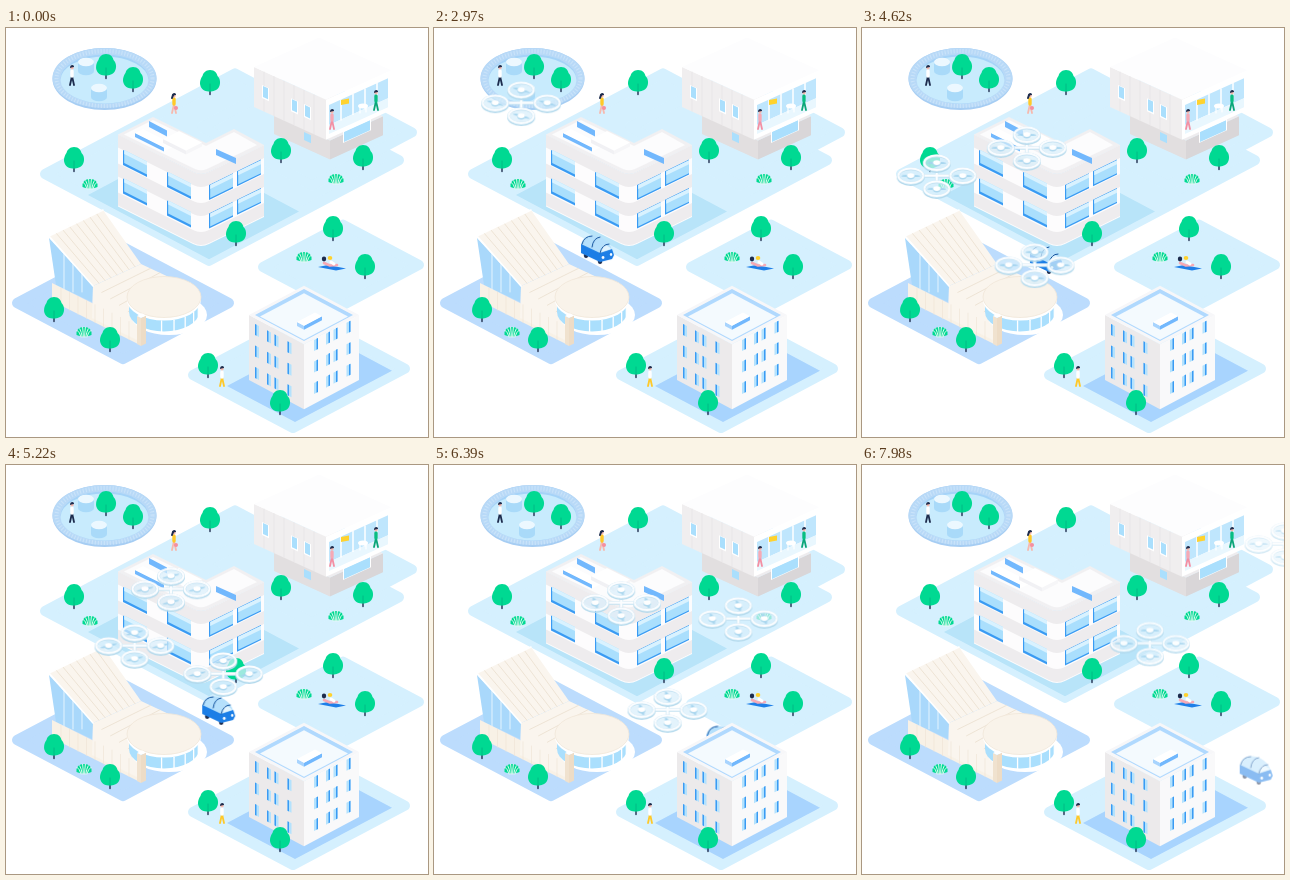
Recreate the animation shown at these times as an HTML page. Size 422 px wide and 409 px high, loop 8000 ms.

```html
<!DOCTYPE html>
<html lang="en">
<head>
<meta charset="utf-8">
<title>Isometric town</title>
<style>
html, body { margin: 0; width: 100%; height: 100%; overflow: hidden; background: #fff; }
svg { display: block; width: 422px; height: 409px; }
.mover { animation: 8s linear infinite both; }
#car { animation-name: car; }
#hover { animation-name: hover; }
#east { animation-name: cross, east; --from: translate(-340px, -105px); --to: translate(378px, 333px); }
#north { animation-name: cross, north; --from: translate(-171px, 455px); --to: translate(424px, 78px); }
.blade { animation: spin .42s linear infinite; }
@keyframes spin { to { transform: rotate(360deg); } }
@keyframes cross { from { transform: var(--from); } to { transform: var(--to); } }
@keyframes east { 0%, 51% { opacity: 0; } 57%, 92% { opacity: 1; } 99%, 100% { opacity: 0; } }
@keyframes north { 0%, 43% { opacity: 0; } 50%, 94% { opacity: 1; } 100% { opacity: .55; } }
@keyframes car {
  0%, 8.6% { transform: translate(18px, 146px); opacity: 0; animation-timing-function: cubic-bezier(.3, .36, .65, .8); }
  37.1% { transform: translate(163px, 221px); opacity: 1; }
  57.8% { transform: translate(184px, 231px); animation-timing-function: cubic-bezier(.4, .25, .7, .65); }
  72.4% { transform: translate(249px, 263px); }
  93% { opacity: 1; }
  100% { transform: translate(395px, 305px); opacity: .5; }
}
@keyframes hover {
  0%, 28.9% { transform: translate(62px, 31px); opacity: 0; }
  33% { opacity: 1; }
  37.1% { transform: translate(87px, 75px); }
  48.8% { transform: translate(163px, 119px); }
  59% { transform: translate(165px, 120px); }
  72.4% { transform: translate(165px, 129px); animation-timing-function: cubic-bezier(.3, .1, .7, .67); }
  100% { transform: translate(289px, 179px); opacity: .9; }
}
</style>
</head>
<body>
<svg id="town" viewBox="0 0 422 409" xmlns="http://www.w3.org/2000/svg"></svg>
<script>
const SKY = '#d5f0fe', GLASS = '#aadffd', BLUE = '#3a9bf3', MID = '#72b8fd', PALE = '#a8d4fe';
const INK = '#1d2c4d', GREEN = '#00d992', GREY = '#eeecee', CREAM = '#faf5ee', SEAM = '#eadfce';
const SLOPE = .53;

const path = (d, fill, extra = '') => `<path d="${d}" fill="${fill}" ${extra}/>`;
const poly = (pts, fill, extra = '') => `<polygon points="${pts.join(' ')}" fill="${fill}" ${extra}/>`;
const oval = (x, y, rx, ry, fill, extra = '') =>
  `<ellipse cx="${x}" cy="${y}" rx="${rx}" ry="${ry}" fill="${fill}" ${extra}/>`;
const line = (d, color, width = 1) =>
  path(d, 'none', `stroke="${color}" stroke-width="${width}" stroke-linecap="round" stroke-linejoin="round"`);
const at = (x, y, body) => `<g transform="translate(${x} ${y})">${body}</g>`;
const each = (list, fn) => list.map(fn).join('');
const times = (n, fn) => Array.from({ length: n }, (_, i) => fn(i)).join('');
const mix = (a, b, t) => a.map((v, i) => v + (b[i] - v) * t);

// Flat rhombus from its left corner: a runs up-right, b runs down-right
const tile = (x, y, a, b, fill, s = SLOPE, extra = '') => poly(
  [[x, y], [x + a, y - a * s], [x + a + b, y + (b - a) * s], [x + b, y + b * s]], fill, extra);
const slab = (x, y, a, b, fill) =>
  tile(x, y, a, b, fill, SLOPE, `stroke="${fill}" stroke-width="10" stroke-linejoin="round"`);
// Upright parallelogram whose top edge has the given slope
const pane = (x, y, w, h, s, fill) => path(`M${x} ${y}l${w} ${w * s}v${h}l${-w} ${-w * s}z`, fill);
const box = (x, y, a, b, h, [top, left, right], s = SLOPE) =>
  pane(x, y, b, h, s, left) + pane(x + b, y + b * s, a, h, -s, right) + tile(x, y, a, b, top, s);
// Evenly spaced seams from edge a-b to edge c-d
const seams = (n, a, b, c, d) => times(n, i => {
  const t = (i + 1) / (n + 1);
  return line(`M${mix(a, b, t)}L${mix(c, d, t)}`, SEAM, .8);
});

const tree = ([x, y]) => at(x, y - 1,
  line('M0 6V13.500', INK, 1.4) +
  path('M0-11C5-11 7-7.500 7.500-5C10-3 11 2 9 6C7 9.500 3 10.500 0 10.500C-4 10.500 -8 9.500 -9.500 5C-10.800 1 -9-3 -7.500-5C-7-8 -4-11 0-11Z', GREEN) +
  line('M0 10V3', '#00b384', .8));

const bush = ([x, y]) => at(x, y,
  path('M-7.500 3Q-8-5 0-5Q8-5 7.500 3Q0 6.500 -7.500 3Z', GREEN) +
  times(6, i => {
    const k = i - 2.5;
    return line(`M${k * 1.2} 5Q${k * 1.6} 0 ${k * 2.8} ${Math.abs(k) * 1.5 - 5.5}`, '#f0fcf8', .9);
  }));

const person = (x, y, shirt, legs, bag = '') => at(x, y,
  line('M0 0L-2 9M0 0L2 9', legs, 1.8) + line('M0-5V0', shirt, 3.4) +
  oval(0, -8.5, 1.7, 2, '#f7b9ae') + path('M-2-8Q-2-11 .5-11Q2.500-10.500 2-9L-.5-8.500Z', INK) + bag);

const barrel = (x, y) =>
  path(`M${x - 8} ${y}v9a8 4.300 0 0 0 16 0v-9z`, '#a9daf9') + oval(x, y, 8, 4.3, '#ecf8ff');

const pool =
  oval(98.5, 51, 52, 31, '#a6cdf3') + oval(98.5, 50, 52, 30, '#b8d9f7') +
  oval(98.5, 50.5, 48, 27.5, 'none', 'stroke="#cbe4fa" stroke-width="4" stroke-dasharray="1 2"') +
  oval(98.5, 51, 44, 24.5, '#a5d3f8') + oval(98.5, 52, 44, 23.5, '#c8ebfd') +
  barrel(80, 34) + barrel(93, 60) + person(66, 48, '#fff', INK);

const grounds =
  slab(39, 146, 190, 164, SKY) + slab(196, 99, 100, 110, SKY) + tile(82, 167, 90, 121, '#b8e4f9') +
  slab(257, 239, 80, 76, SKY) +
  slab(11, 275, 106, 106, '#bcdcfd') +
  slab(187, 347, 112, 100, SKY) + tile(221, 358, 97, 68, PALE);

const HOUSE = .455;
const house =
  box(268, 87, 53, 56, 19, [GREY, '#e2dfe0', '#d9d6d8'], HOUSE) +
  pane(337, 103, 28, 12, -HOUSE, '#fff') + pane(338, 104, 26, 10, -HOUSE, GLASS) +
  pane(298, 104, 7, 8, HOUSE, GLASS) +
  box(248, 39, 65, 72, 40, ['#fdfdfe', '#f0eeef', '#fff'], HOUSE) +
  times(6, i => line(`M${258 + i * 10} ${44 + i * 4.6}v39`, '#e4e1e3', .6)) +
  each([256, 285, 298], x => {
    const y = 57 + (x - 256) * HOUSE;
    return pane(x, y, 7, 13, HOUSE, '#fff') + pane(x + 1, y + 1, 5, 11, HOUSE, GLASS);
  }) +
  pane(323, 77, 59, 20, -HOUSE, '#bfe6fd') + pane(323, 97, 59, 9, -HOUSE, '#e9f7fe') +
  times(4, i => line(`M${335 + i * 12} ${72 - i * 5.5}v20`, '#fff', 1.5)) +
  pane(335, 72, 8, 5, -.2, '#ffd22e') +
  oval(357, 78, 5, 2.5, '#fff') + line('M354 80V85M360 80V84', '#fff', 1.2) +
  person(326, 92, '#f6a9b5', '#f38fa3') + person(370, 73, '#08bd83', '#0aa579');

// Office facade strip: left wall, rounded corner, right wall
const strip = (y, h) => {
  const edge = (v, back) => back
    ? `L258 ${117 + v}L203 ${144 + v}Q195 ${148 + v} 187 ${144 + v}L112 ${106.5 + v}`
    : `M112 ${106.5 + v}L187 ${144 + v}Q195 ${148 + v} 203 ${144 + v}L258 ${117 + v}`;
  return edge(y) + edge(y + h, true) + 'Z';
};
const wideWindow = (x, y, s) =>
  pane(x, y, 24, 15, s, BLUE) + pane(x + 1.2, y, 22.8, 13, s, GLASS) + pane(x + 1.2, y, 22.8, 4, s, '#d9f2ff');

const office =
  path(strip(0, 72), '#fdfcfd') +
  each([0, 29, 58], y => path(strip(y, 13), GREY)) +
  times(4, i => {
    const col = i % 2 * (i < 4), row = i >> 1, drop = 13 + row * 28.5;
    return wideWindow(117 + col * 44, 109 + col * 22 + drop, .5) +
      wideWindow(203 + col * 28, 144 - col * 13.7 + drop, -.49);
  }) +
  path('M112 106.500L147 89L200 115L228 101L258 117L203 144Q195 148 187 144Z', '#f1f0f2') +
  path('M118 106.500L147 92L200 118L228 104L251 117L201 141Q195 143.500 189 141Z', '#fcfcfd') +
  pane(143, 93, 18, 6, SLOPE, MID) +
  box(129, 105, 8, 29, 4, ['#fff', MID, '#fff'], .5) +
  box(157, 111, 16, 23, 4, ['#fff', '#f1f1f4', '#f6f6f8'], .5) +
  pane(210, 121, 20, 6, .45, MID);

const ROOF = { left: [43, 208], top: [97, 182], right: [135, 236], low: [87, 258] };
const theater =
  poly([[43, 210], [50, 257], [86, 274], ROOF.low], '#a9d8fb') +
  times(3, i => line(`M${58 + i * 9} ${224 + i * 11}V264`, '#e4f4fe')) +
  pane(46, 255, 85, 18, .5, '#f8f1e6') +
  poly([ROOF.low, ROOF.right, [182, 258], [131, 292], [131, 312], [86, 290]], CREAM) +
  times(9, i => line(`M${55 + i * 8.5} ${260 + i * 4.2}v18`, '#eee3d4', .6)) +
  poly(Object.values(ROOF), CREAM) +
  seams(7, ROOF.left, ROOF.top, ROOF.low, ROOF.right) +
  seams(4, ROOF.low, [131, 290], ROOF.right, [182, 258]) +
  line(`M${ROOF.low}L${ROOF.left}L${ROOF.top}`, '#fff', 1.6) +
  oval(163, 287, 38, 20, '#fff') +
  path('M123 272v12a35 19.500 0 0 0 70 0v-12z', GLASS) +
  times(5, i => {
    const a = .2 + i * .36;
    return line(`M${158 + 35 * Math.cos(a)} ${274 + 19 * Math.sin(a)}v11`, '#fff', 1.3);
  }) +
  path('M121 269v3a37 20.500 0 0 0 74 0v-3z', '#fff') +
  oval(158, 269, 37, 20.5, '#f9f3ea', 'stroke="#f0e6d8" stroke-width=".8"') +
  box(131, 288, 5, 4, 28, ['#fff', '#f0e2cf', '#eddcc6']);

const slit = (x, y, s) => pane(x, y, 4, 11, s, '#b4e2fd') + pane(s > 0 ? x : x + 2.5, s > 0 ? y : y - 1.3, 1.5, 11, s, BLUE);
const tower =
  box(243, 287, 55, 55, 65, ['#f7f7f9', '#eceaeb', '#f9f9fa']) +
  tile(249, 287, 49, 49, '#b0d9fe') + tile(254, 288.5, 44, 44, '#f4fafe') +
  box(291, 294, 18, 7, 4, ['#fff', PALE, MID]) +
  times(3, row => each([0, 12, 19.5, 32.5], dx =>
    slit(249 + dx, 296 + dx * SLOPE + row * 21.5, SLOPE) +
    slit(308 + dx, 312 - dx * SLOPE + row * 21.5, -SLOPE)));

const picnic =
  tile(312, 239, 10, 18, '#1f7fe8', .2) +
  line('M318 235L324 237.500L331 237', '#f6a9b5', 2.6) + line('M325 234L328 236', '#fff', 3) +
  oval(318, 231, 2.2, 2.4, INK) + oval(324, 230, 2.3, 2, '#ffd22e');

const walkers =
  person(168, 76, '#ffc928', '#f7b9ae', oval(2, 4, 2, 2, '#f58fa0') + line('M-1-9L-2-6', INK, 2)) +
  person(216, 349, '#fff', '#ffc928');

const car = `<g id="car" class="mover">` +
  times(2, i => oval(-11 + i * 14, 6 + i * 6, 2.2, 3, INK)) +
  path('M-16-5C-14-12 -9-14 -3-13.500C5-13 13-7 15 1L3 5L-16-3Z', '#b5e0fc') +
  path('M-16-5L3 4L15 0L17 6L15 10L3 13L-16 4Z', '#1c7ee6') +
  path('M4 3L6-4Q11-4 14 0Z', '#e3f5ff') +
  line('M-15-5Q-13-13 -5-13M-5-2Q-4-11 3-12M3 4Q5-5 12-5', '#14549f') +
  oval(6, 8.5, 1.4, 1.4, '#fff') + oval(14, 5.5, 1.2, 1.4, '#fff') + '</g>';

const rotor = (dx, dy) => at(dx, dy,
  oval(0, 1.4, 13.2, 7.8, 'none', 'stroke="#b3d9ec" stroke-width="1.4"') +
  oval(0, 0, 12.5, 7.2, '#d8effb', 'fill-opacity=".72"') +
  `<g transform="scale(1 .58)"><g class="blade">${oval(0, 0, 9.5, 2, '#a3d3ee')}</g></g>` +
  oval(0, 0, 12.5, 7.2, 'none', 'stroke="#c2e1f1" stroke-width="2.8"') +
  oval(0, -.2, 12.5, 7.2, 'none', 'stroke="#fbfdff" stroke-width="2"') +
  oval(0, .8, 3.8, 2.7, '#aed8ef') + oval(0, -.4, 3.6, 2.4, '#fff'));

const drone = id => `<g id="${id}" class="mover">` +
  line('M-14 0H14M0-6V6', '#c2e1f1', 3.4) + line('M-14-.4H14M0-6V6', '#fbfdff', 2.4) +
  times(4, i => {
    const a = (i - 1) * Math.PI / 2;
    return rotor(26 * Math.cos(a), 13 * Math.sin(a));
  }) + '</g>';

const trees = [[100, 38], [127, 51], [204, 54], [68, 131], [275, 122], [357, 129], [230, 205],
  [327, 200], [359, 238], [48, 281], [104, 311], [202, 337], [274, 374]];
const bushes = [[84, 156], [330, 151], [298, 229], [78, 304]];

document.getElementById('town').innerHTML =
  grounds + pool + house + office + car + theater + tower +
  each(bushes, bush) + walkers + picnic + each(trees, tree) +
  each(['hover', 'east', 'north'], drone);
</script>
</body>
</html>
```
